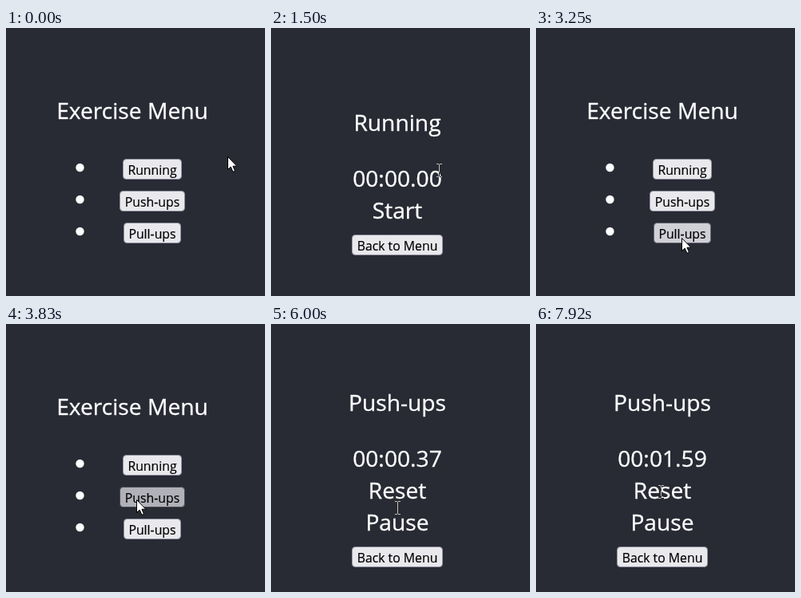
Write an HTML page that moves like this. It is 324 px wide and 336 px high and loops after 8 s.

```html
<!DOCTYPE html>
<html lang="en">
<head>
<meta charset="utf-8">
<title>Exercise Menu</title>
<style>
  html, body { margin: 0; height: 100%; overflow: hidden; background: #282a34; }
  svg { display: block; }
  text { font-family: "Open Sans", "Noto Sans", sans-serif; text-anchor: middle; }
  .line { font-size: 28.2px; fill: #fff; stroke: #fff; stroke-width: .35px; }
  .label { font-size: 15.8px; fill: #000; stroke: #000; stroke-width: .2px; }
  .arrow { fill: #fff; stroke: #000; stroke-linejoin: round; }
  .beam { fill: none; stroke: #f0ece4; mix-blend-mode: difference; }
</style>
</head>
<body>
<svg id="stage" width="324" height="336" viewBox="0 0 324 336"></svg>
<script>
const LOOP = 8000, FPS = 12, LAST_STEP = 95;
const CENTER = 158, LIST_CENTER = 183;
const stage = document.getElementById('stage');

// Steps at which each click takes effect.
const OPEN_RUNNING = 14, BACK = 36, OPEN_PUSHUPS = 47, START = 66;
const CLICKS = [OPEN_RUNNING, BACK, OPEN_PUSHUPS];

// Button colours: fill, border
const IDLE = ['#e9e9ed', '#8f8f9d'], HOVER = ['#d0d0d7', '#676774'], ACTIVE = ['#b1b1b9', '#484851'];

// Pointer stops: step, x, y
const PATH = [
  [0, 277, 161], [2, 277, 161], [9, 210, 178], [22, 210, 178],
  [29, 185, 264], [32, 184, 264], [38, 184, 268], [43, 163, 220],
  [50, 163, 220], [56, 158, 230], [82, 158, 230], [88, 156, 210], [96, 156, 210]
];

function pointerAt(step) {
  const i = PATH.findIndex(stop => stop[0] > step);
  const [s0, x0, y0] = PATH[i - 1], [s1, x1, y1] = PATH[i];
  const p = (step - s0) / (s1 - s0), e = p * p * (3 - 2 * p);
  return { x: Math.round(x0 + (x1 - x0) * e), y: Math.round(y0 + (y1 - y0) * e) };
}

const line = (text, y) => `<text class="line" x="${CENTER}" y="${y}">${text}</text>`;

function button(text, cx, top, width, pointer, pressed) {
  const over = Math.abs(pointer.x - cx) < width / 2 && pointer.y >= top && pointer.y < top + 26;
  const [fill, border] = !over ? IDLE : pressed ? ACTIVE : HOVER;
  return `<rect x="${cx - width / 2 + .5}" y="${top + .5}" width="${width - 1}" height="25" rx="4"
    fill="${fill}" stroke="${border}"/><text class="label" x="${cx}" y="${top + 20}">${text}</text>`;
}

function menu(pointer, pressed) {
  const items = [['Running', 74], ['Push-ups', 82], ['Pull-ups', 72]];
  return line('Exercise Menu', 114) + items.map(([text, width], i) =>
    `<circle cx="92.5" cy="${175 + i * 40}" r="5.2" fill="#fff"/>` +
    button(text, LIST_CENTER, 164 + i * 40, width, pointer, pressed)).join('');
}

function clock(centis) {
  const two = n => String(n).padStart(2, '0');
  return `${two(Math.floor(centis / 6000))}:${two(Math.floor(centis / 100) % 60)}.${two(centis % 100)}`;
}

function exercise(name, step, pointer, pressed) {
  const started = step >= START;
  const top = started ? 109 : 129;
  const centis = started ? Math.round(37 + (step - 72) * 5.304) : 0;
  const rows = [clock(centis), ...(started ? ['Reset', 'Pause'] : ['Start'])];
  return line(name, top) +
    rows.map((text, i) => line(text, top + 70 + i * 40)).join('') +
    button('Back to Menu', CENTER, started ? 279 : 259, 114, pointer, pressed);
}

function cursor({ x, y }, onText) {
  return onText
    ? `<path class="beam" transform="translate(${x + .5} ${y})"
        d="M-3.5 -7.5H-.5M.5 -7.5H3.5M0 -7V8M-3.5 8.5H-.5M.5 8.5H3.5"/>`
    : `<path class="arrow" transform="translate(${x + .5} ${y + .5})"
        d="M0 0V16L3.7 12.6L6.4 18.8L9 17.7L6.4 11.7H11.3Z"/>`;
}

function draw(step) {
  const pointer = pointerAt(step);
  const pressed = CLICKS.some(click => step >= click - 2 && step < click);
  const inMenu = step < OPEN_RUNNING || (step >= BACK && step < OPEN_PUSHUPS);
  const name = step < BACK ? 'Running' : 'Push-ups';
  stage.innerHTML = '<rect width="324" height="336" fill="#282a34"/>' +
    (inMenu ? menu(pointer, pressed) : exercise(name, step, pointer, pressed)) +
    cursor(pointer, !inMenu && pointer.y < 250);
}

let shown = -1;
function tick() {
  const time = performance.now() % LOOP;
  const step = Math.min(LAST_STEP, Math.floor((time + 5) * FPS / 1000));
  if (step !== shown) draw(shown = step);
  requestAnimationFrame(tick);
}
tick();
</script>
</body>
</html>
```
